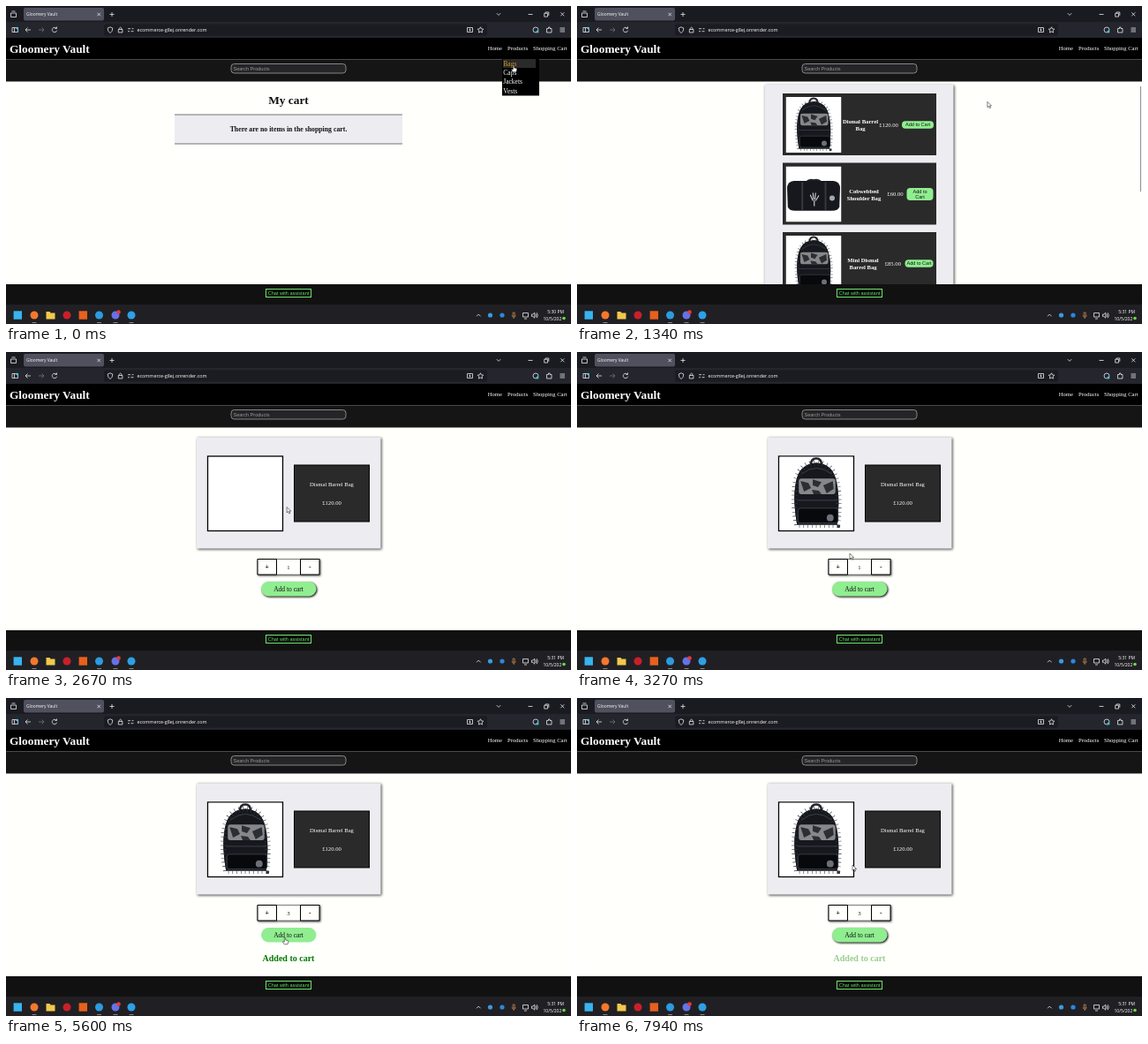
Write an HTML page that moves like this. It is 640x360 px and loops after 8000 ms.

```html
<!DOCTYPE html>
<html lang="en">
<head>
<meta charset="utf-8">
<title>Shop walkthrough</title>
<style>
  html, body { margin: 0; width: 100%; height: 100%; overflow: hidden; background: #000; }
  svg { display: block; width: 640px; height: 360px; }
  text { font: 6.667px "Liberation Serif", serif; fill: #fff; }
  .h1 { font-size: 13.333px; font-weight: bold; }
  .h2 { font-size: 10px; font-weight: bold; }
  .h3 { font-size: 7.8px; font-weight: bold; }
  .bold { font-weight: bold; }
  .big { font-size: 7.5px; }
  .mid { text-anchor: middle; }
  .dark { fill: #111; }
  .form { font: 5.555px "Liberation Sans", sans-serif; }
  .ui { font: 5.4px "Open Sans", sans-serif; }
  .icons { fill: none; stroke: #e8e8ec; stroke-width: .8; }
  .panel { fill: #ececf1; filter: drop-shadow(1px 1px 1.5px #444); }
  .box { fill: #2a2a2b; }
  .green { fill: #90ee90; }
</style>
</head>
<body>
<svg viewBox="0 0 640 360">
  <defs>
    <symbol id="backpack" viewBox="0 0 84 84">
      <rect width="84" height="84" fill="#fff"/>
      <path d="M36 9Q36 2 42 2T48 9" fill="none" stroke="#22242a" stroke-width="2.5"/>
      <path id="body" d="M20 78Q14 44 20 24Q25 8 42 7Q59 8 64 24Q70 44 66 78Z" fill="#16181e"/>
      <use href="#body" fill="none" stroke="#33353c" stroke-width="7" stroke-dasharray=".6 4.2"/>
      <path d="M25 20Q42 6 60 20M20 50H66" fill="none" stroke="#3c3f48"/>
      <rect x="22" y="25" width="42" height="18" rx="3" fill="#85878a"/>
      <path d="M24 28l9 2 3 6-8 4zM38 26l10 3-4 6-6-2zM50 33l11-5 1 9-8 5zM37 38l8 1 3 4h-9z" fill="#2c2e33"/>
      <rect x="21" y="59" width="46" height="17" rx="3" fill="#08090d" stroke="#3a3d45"/>
      <circle cx="58" cy="70" r="4" fill="#6d7078"/>
    </symbol>
    <symbol id="duffel" viewBox="0 0 84 84">
      <rect width="84" height="84" fill="#fff"/>
      <path d="M25 40Q29 17 42 21Q56 17 60 40" fill="none" stroke="#22242a" stroke-width="3"/>
      <path d="M2 32Q3 23 12 22L72 22Q81 23 82 32L81 61Q79 67 70 67H14Q5 67 3 61Z" fill="#16181e"/>
      <path d="M25 24V66M60 24V66" stroke="#363941" stroke-width="2.5"/>
      <path d="M43 60V51M41 52L37 43M42 50L41 40M44 50L45 40M45 52L50 44" stroke="#d0d1d6" stroke-width="1.5"/>
      <circle cx="70" cy="48" r="4" fill="#a4a6ad"/>
    </symbol>
  </defs>

  <rect width="640" height="360" fill="#fffffc"/>

  <g id="cart">
    <text class="h1 mid dark" x="320" y="110.5">My cart</text>
    <rect x="191" y="123" width="258" height="33" fill="#ececf1"/>
    <path d="M191 123H449M191 156H449" stroke="#555" stroke-width=".8"/>
    <text class="h3 mid dark" x="320" y="142">There are no items in the shopping cart.</text>
  </g>

  <g id="list">
    <rect class="panel" x="212.500" y="89" width="214" height="240"/>
    <g id="cards"></g>
    <path id="scroll" d="M638.500 91V210" stroke="#8c8c90"/>
  </g>

  <g id="product">
    <rect class="panel" x="216" y="96.500" width="208.500" height="126"/>
    <rect x="228.500" y="118" width="85" height="84.500" fill="#fff" stroke="#000" stroke-width="1.300"/>
    <use id="photo" href="#backpack" x="229.500" y="118.500" width="83" height="83"/>
    <rect class="box" x="326.500" y="128" width="85" height="64" stroke="#000"/>
    <text class="mid" x="369" y="151.500">Dismal Barrel Bag</text>
    <text class="mid" x="369" y="172.500">£120.00</text>
    <g style="filter:drop-shadow(1px 1px 1px #666)">
      <rect x="285" y="234.500" width="70" height="17.500" fill="#fffffc" stroke="#555" stroke-width=".7"/>
      <path d="M285 234.500h21.500v17.500h-21.500zM333.500 234.500h21.500v17.500h-21.500z" fill="#fffffc" stroke="#000"/>
    </g>
    <text class="h3 mid dark" x="295.700" y="246">+</text>
    <text class="mid dark" id="count" x="320" y="245.500"></text>
    <text class="h3 mid dark" x="344.300" y="245.500">-</text>
    <rect class="green" id="add" x="289" y="260" width="62.500" height="16.500" rx="8.250"/>
    <text class="big mid dark" x="320" y="270.700">Add to cart</text>
    <text class="h2 mid" id="added" x="320" y="298.300">Added to cart</text>
  </g>

  <!-- Browser frame -->
  <rect width="640" height="18" fill="#1a1a21"/>
  <rect y="18" width="640" height="18" fill="#25252d"/>
  <rect x="111" y="20.500" width="434" height="13" rx="2" fill="#1b1b22"/>
  <rect x="20" y="2" width="91" height="14.500" rx="2" fill="#50505e"/>
  <text class="ui" x="23" y="11.300" style="font-size:4.900px">Gloomery Vault</text>
  <text class="ui" x="148.500" y="29.300">ecommerce-g8ej.onrender.com</text>
  <g class="icons">
    <path d="M5.500 8h6v4.500h-6zM6.500 6h4M103.500 7.800l3.400 3.400m0-3.400l-3.400 3.400M117.500 9.500h5m-2.500-2.500v5M555.800 8.200l2.200 2.200 2.200-2.200M591.500 9.500h5M609.700 8.300h3.800v3.800h-3.800zM611 8V7h3.800v3.800M628.300 7.300l4 4m0-4l-4 4"/>
    <path d="M7 24.500h6.500v5H7zM9.500 24.500v5M28 27h-6m2.500-2.500L22 27l2.500 2.500M57 25.200a2.700 2.700 0 1 0 .6 2.500M57.500 23.500v2h-2"/>
    <path d="M37 27h6m-2.500-2.500L43 27l-2.500 2.500" stroke="#75757c"/>
    <path d="M118 23.800l2.800 1.200q0 4-2.800 5.600q-2.800-1.600-2.800-5.600zM127.300 26.500h4.600v3.500h-4.600zM128.200 26.500v-1.200q1.400-2.500 2.800 0v1.200M138 25.700h3m1.500 0h2M138 28.700h2m1.500 0h3"/>
    <path d="M522.500 24.500h6v5h-6zM525.500 25.500v2.500m-1.300-1.200l1.300 1.300 1.300-1.300M537.500 23.800l1 2.100 2.300.3-1.700 1.600.4 2.300-2-1.100-2 1.100.4-2.300-1.700-1.600 2.300-.3z"/>
    <circle cx="600" cy="27" r="3"/>
    <path d="M612.500 25.500h2v-1.500h1.500v1.500h2v4.500h-5.500zM627.500 25h5.500m-5.500 2h5.500m-5.500 2h5.500"/>
  </g>
  <circle cx="12.500" cy="25" r="1.300" fill="#35c8e8"/>
  <circle cx="602" cy="29" r="1.500" fill="#35c8e8"/>

  <!-- Site header -->
  <rect y="36" width="640" height="24.500" fill="#000"/>
  <rect y="60.500" width="640" height="25" fill="#151515"/>
  <text class="h1" x="4" y="52.500">Gloomery Vault</text>
  <text x="545.700" y="50.300">Home</text>
  <text x="568" y="50.300">Products</text>
  <text x="597" y="50.300">Shopping Cart</text>
  <rect x="255" y="65.500" width="130" height="10.500" rx="3.500" fill="#252527" stroke="#a0a0a2" stroke-width=".8"/>
  <text class="form" x="257.500" y="72.800" style="fill:#9a9a9c">Search Products</text>
  <g id="menu">
    <rect x="562" y="59.500" width="42" height="42"/>
    <rect x="563" y="60" width="37" height="10" fill="#2a2a2b"/>
    <text class="big" x="563.300" y="67.500" style="fill:#c8951c">Bags</text>
    <text class="big" x="563.300" y="78">Caps</text>
    <text class="big" x="563.300" y="88.300">Jackets</text>
    <text class="big" x="563.300" y="98.700">Vests</text>
  </g>

  <!-- Site footer and taskbar -->
  <rect y="315" width="640" height="23" fill="#111"/>
  <rect x="294.500" y="320.500" width="51" height="9" fill="#000" stroke="#74e874"/>
  <text class="form mid" x="320" y="327" style="fill:#74e874">Chat with assistant</text>
  <rect y="338" width="640" height="22" fill="#202024"/>
  <g id="apps"></g>
  <circle cx="127.500" cy="346.500" r="2.300" fill="#e43c3c"/>
  <path d="M29.500 358.500h5M103 358.500h5M121.500 358.500h5M139.500 358.500h5" stroke="#a4a4a8" stroke-width=".8"/>
  <g class="icons">
    <path d="M533 351.300l2.300-2.300 2.300 2.300M585.500 347.500h6v4.500h-6zM587 354h3M595.500 349h1.300l2-1.800v6l-2-1.800h-1.300zM600 348.500q1.200 1.700 0 3.500M601.300 347.300q2 2.900 0 5.800"/>
    <path d="M574.200 347h2v4h-2zM573 350.500q2.200 4 4.400 0M575.200 352.500v1.500" stroke="#c88a50"/>
  </g>
  <text class="ui" id="clock" x="632" y="348.300" text-anchor="end" style="font-size:5px"></text>
  <text class="ui" x="608.500" y="355.500" style="font-size:5px">10/5/202</text>
  <circle cx="632" cy="353.500" r="1.800" fill="#6edc4e"/>

  <g id="pointer" stroke="#000" stroke-width=".5" fill="#fff">
    <path id="arrow" d="M0 0V6.300L1.500 5 2.600 7.300 3.700 6.800 2.700 4.600H4.600Z"/>
    <path id="hand" d="M-.7 .5Q0-.5.7.5V3L3.400 3.600Q4 4 3.700 5.500L3 7.800H-.8L-2.700 5Q-2.500 4-.7 5Z"/>
  </g>
</svg>

<script>
const el = id => document.getElementById(id);
const cards = [
  { y: 99, art: 'backpack', name: ['Dismal Barrel', 'Bag'], nameX: 321, price: '£120.00', priceX: 342.3, button: [368, 36], label: ['Add to Cart'] },
  { y: 177.500, art: 'duffel', name: ['Cobwebbed', 'Shoulder Bag'], nameX: 325, price: '£60.00', priceX: 351.300, button: [373.500, 30], label: ['Add to', 'Cart'] },
  { y: 256, art: 'backpack', name: ['Mini Dismal', 'Barrel Bag'], nameX: 324, price: '£85.00', priceX: 348.700, button: [371.500, 32], label: ['Add to Cart'] },
];
const lines = (list, style, x, y, step) => list.map((s, i) =>
  `<text class="${style}" x="${x}" y="${y + (i - (list.length - 1) / 2) * step}">${s}</text>`).join('');

el('cards').innerHTML = cards.map(c => {
  const [x, w] = c.button, h = c.label.length > 1 ? 14 : 8.500;
  return `<rect class="box" x="233" y="${c.y}" width="174" height="70"/>
    <use class="thumb" href="#${c.art}" x="236.500" y="${c.y + 4}" width="63" height="63"/>
    ${lines(c.name, 'bold mid', c.nameX, c.y + 38, 8)}
    <text x="${c.priceX}" y="${c.y + 37.700}">${c.price}</text>
    <rect class="green" x="${x}" y="${c.y + 35.500 - h / 2}" width="${w}" height="${h}" rx="4"/>
    ${lines(c.label, 'form mid dark', x + w / 2, c.y + 37.400, 6.200)}`;
}).join('');

const dot = (x, color, r = 4.500) => `<circle cx="${x}" cy="350" r="${r}" fill="${color}"/>`;
const square = (x, color) => `<rect x="${x - 4.700}" y="345.300" width="9.400" height="9.400" fill="${color}"/>`;
el('apps').innerHTML = '<path d="M45.500 346h4l1 1.500h5v7h-10z" fill="#f2c94c"/>'
  + square(13.300, '#38b4ee') + dot(32, '#f5782c') + dot(69, '#c8202b') + square(87.300, '#e8601c') + dot(105.500, '#2c9be0')
  + dot(124, '#6672e8') + dot(142, '#2da0e6') + dot(548.500, '#3a9be0', 2.600) + dot(562, '#2f86dc', 2.600);

// Pointer tip: time, x, y
const path = [
  [0, 575, 67], [800, 575, 67], [1650, 402, 132], [1980, 321, 156], [2450, 321, 156],
  [3140, 312, 217], [3270, 309, 228], [3500, 297, 241], [4250, 297, 241],
  [4700, 316, 271], [6780, 316, 271], [7000, 312, 216], [7200, 312, 189], [8000, 312, 189],
];
const ramp = (t, a, b) => Math.min(1, Math.max(0, (t - a) / (b - a)));
const within = (t, a, b) => t >= a && t < b;
const show = (node, on) => { node.style.display = on ? '' : 'none'; };
const shadow = (node, alpha) => { node.style.filter = `drop-shadow(1.5px 1.5px 1px rgb(0 0 0 / ${alpha}))`; };
const thumbs = document.querySelectorAll('.thumb');
const firstCard = document.querySelector('#cards .box');

function draw(t) {
  el('menu').style.opacity = 1 - ramp(t, 70, 270);
  show(el('cart'), t < 470);
  show(el('list'), within(t, 800, 2340));
  show(el('scroll'), t >= 870);
  thumbs.forEach(node => show(node, t >= 1270));
  shadow(firstCard, ramp(t, 1650, 1950));

  show(el('product'), t >= 2670);
  show(el('photo'), t >= 2870);
  el('count').textContent = t < 3700 ? 1 : t < 4130 ? 2 : 3;
  shadow(el('add'), 1 - ramp(t, 4550, 4740) + ramp(t, 7010, 7260));

  show(el('added'), t >= 5600);
  const fade = (1 - Math.cos((t - 5600) / 3600 * 2 * Math.PI)) / 2;
  const mix = (a, b) => a + (b - a) * fade;
  el('added').style.fill = `rgb(${mix(0, 190)} ${mix(120, 228)} ${mix(0, 180)})`;
  el('clock').textContent = t < 1300 ? '5:30 PM' : '5:31 PM';

  const i = path.findIndex(p => p[0] > t);
  const [t0, x0, y0] = path[i - 1], [t1, x1, y1] = path[i], k = ramp(t, t0, t1);
  el('pointer').setAttribute('transform', `translate(${x0 + (x1 - x0) * k} ${y0 + (y1 - y0) * k})`);
  const pointing = t < 270 || within(t, 1650, 2340) || within(t, 3450, 4300) || within(t, 4550, 6820);
  show(el('hand'), pointing);
  show(el('arrow'), !pointing);
}

const start = performance.now();
(function tick() {
  draw((performance.now() - start) % 8000);
  requestAnimationFrame(tick);
})();
</script>
</body>
</html>
```
